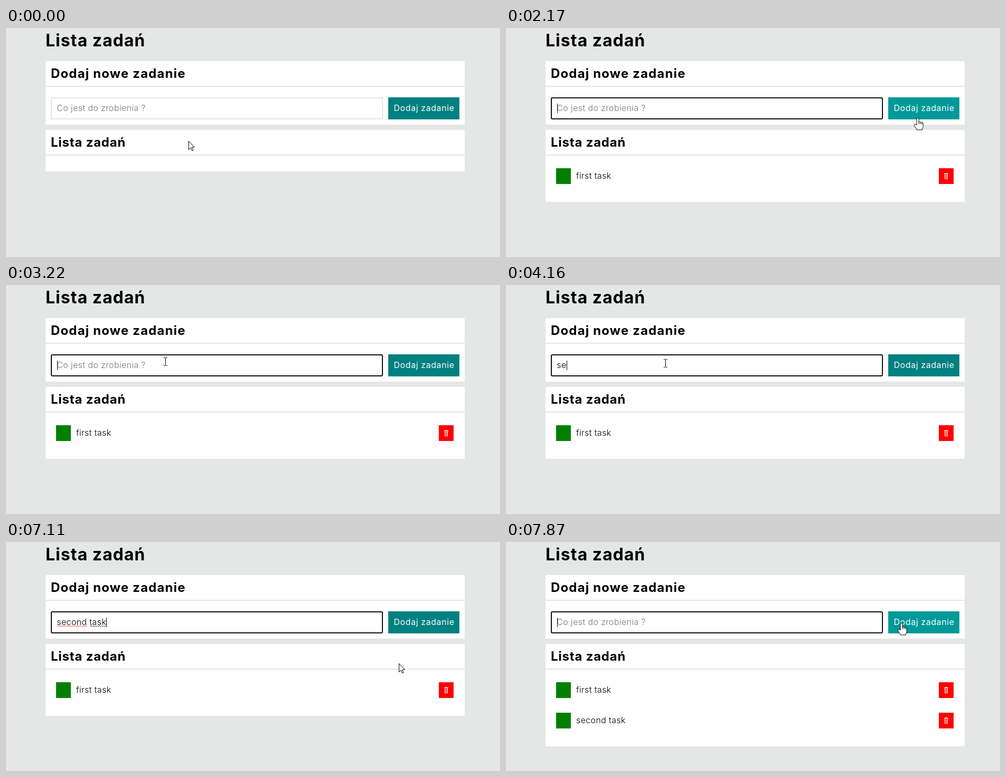
An HTML page for the animation above (8 s loop, 937x436 px).

```html
<!DOCTYPE html>
<html lang="pl">
<head>
<meta charset="utf-8">
<title>Lista zadań</title>
<style>
  html, body { margin: 0; width: 100%; height: 100%; overflow: hidden; background: #e4e7e5; }
  svg { display: block; }
  text { font: 350 16px Inter, Lato, sans-serif; font-optical-sizing: none; letter-spacing: .023em; }
  .h1 { font-size: 32px; font-weight: 700; letter-spacing: .032em; }
  .h2 { font-size: 24px; font-weight: 700; letter-spacing: .032em; }
  .wide { letter-spacing: .048em; }
  .label { fill: #fff; font-weight: 400; letter-spacing: .036em; }
  .hint { fill: #757575; }
  .wave { fill: none; stroke-width: .9; }
</style>
</head>
<body>
<svg width="937" height="436" viewBox="0 0 937 436">
  <defs>
    <g id="trash" fill="none" stroke="#fff">
      <path d="M831 277.5h8M832.5 278v9.5h5V278M833.5 276.5h3" />
      <path d="M834.5 279v7M836 279v7" stroke-width=".7" />
    </g>
  </defs>

  <text class="h1" x="75" y="35">Lista zadań</text>

  <rect x="75" y="63" width="795" height="121" fill="#fff" />
  <rect x="75" y="110" width="795" height="2" fill="#e4e7e5" />
  <text class="h2 wide" x="85" y="95">Dodaj nowe zadanie</text>

  <rect id="field" x="86" y="133" width="628" height="40" fill="#fff" stroke-width="2" />
  <text id="hint" class="hint" x="96.3" y="158">Co jest do zrobienia ?</text>
  <text id="typed" x="96.3" y="158" xml:space="preserve"></text>
  <path id="wave1" class="wave" stroke="#f22" />
  <path id="wave2" class="wave" />
  <rect id="caret" y="144" width="1" height="18" />

  <rect id="button" x="725" y="132" width="135" height="42" />
  <text class="label" x="735.5" y="158">Dodaj zadanie</text>

  <rect id="panel" x="75" y="194" width="795" fill="#fff" />
  <rect x="75" y="241" width="795" height="2" fill="#e4e7e5" />
  <text class="h2" x="85" y="226">Lista zadań</text>

  <g id="row1">
    <rect x="95" y="267" width="28" height="30" fill="#008000" />
    <text x="133" y="287">first task</text>
    <rect x="821" y="267" width="28" height="30" fill="#f00" />
    <use href="#trash" />
  </g>
  <g id="row2" transform="translate(0 58)">
    <rect x="95" y="267" width="28" height="30" fill="#008000" />
    <text x="133" y="287">second task</text>
    <rect x="821" y="267" width="28" height="30" fill="#f00" />
    <use href="#trash" />
  </g>

  <g id="mouse">
    <path id="arrow" d="M.5.5V16.5L4.2 13L6.8 18.7L9 17.8L6.6 12H11.5Z" fill="#fff" stroke="#000" />
    <path id="beam" d="M-3-7.5H0M1-7.5H4M.5-7V7M-3 7.5H0M1 7.5H4" fill="none" stroke="#000" />
    <path id="hand" d="M-2 14V2a2 2 0 0 1 4 0V8q2-1.5 3 .6q2-1 3 .8q2.2-.5 2.2 1.8V16q0 3-2 5V23H-2V21.5Q-5 18-6.7 14.5Q-7 11.6-4.6 12Z M2 8v4M5 9v3M8 10v2.500" fill="#fff" stroke="#000" />
  </g>
</svg>

<script>
const LOOP = 8000, STEP = 70, BLINK = 530;
const $ = id => document.getElementById(id);
const show = (id, on) => { $(id).style.display = on ? '' : 'none'; };

// time, x, y of the pointer; moves between rows go in whole steps
const path = [
  [0, 346, 215], [70, 290, 175], [210, 290, 175], [280, 289, 164], [350, 289, 156],
  [1410, 289, 156], [1550, 661, 148], [1690, 750, 160], [1830, 781, 171],
  [2310, 781, 171], [2450, 646, 175], [2660, 324, 89], [2730, 318, 97],
  [3010, 302, 146], [3490, 302, 146], [3630, 302, 149],
  [6760, 302, 149], [6970, 600, 265], [7110, 745, 231], [7320, 750, 185], [7530, 750, 154]
];

const FOCUS = 680;
const entries = [
  { text: 'first task', keys: [...'first task'].map((c, i) => 1070 + i * 46),
    wave: [1300, 1480], color: '#f22', blur: 1900, add: 1970 },
  { text: 'second task', keys: [3960, 4160, 4420, 4620, 4890, 5020, 5220, 5420, 5620, 5820, 6020],
    wave: [5420, 6830], color: '#222', blur: 7670, add: 7740 }
];
const wakes = [FOCUS, ...entries.flatMap(e => [...e.keys, e.add])];

function pointer(t) {
  const i = path.findLastIndex(p => p[0] <= t);
  const a = path[i], b = path[i + 1] || a;
  const u = b === a ? 0 : Math.floor((t - a[0]) / STEP) * STEP / (b[0] - a[0]);
  return [1, 2].map(k => Math.round(a[k] + (b[k] - a[k]) * u));
}

function squiggle(id, on, from, to) {
  show(id, on);
  if (!on) return;
  let d = '';
  for (let x = from, i = 0; x <= to; x += 2, i++) d += (i ? 'L' : 'M') + x + ' ' + (i % 2 ? 159.3 : 161.3);
  $(id).setAttribute('d', d);
}

function draw(t) {
  const entry = entries.find(e => t < e.add);
  const count = entry ? entry.keys.filter(k => k <= t).length : 0;
  const focus = t >= FOCUS && !(entry && t >= entry.blur);
  const typed = $('typed');
  typed.textContent = entry ? entry.text.slice(0, count) : '';
  show('hint', !count);

  $('field').setAttribute('stroke', focus ? '#101010' : '#e4e7e5');
  $('field').setAttribute('rx', focus ? 2 : 0);

  const width = n => n ? typed.getSubStringLength(0, n) : 0;
  const woke = Math.max(...wakes.filter(w => w <= t));
  show('caret', focus && Math.floor((t - woke) / BLINK) % 2 === 0);
  $('caret').setAttribute('x', Math.round(96.5 + width(count)));

  const gap = entry ? entry.text.indexOf(' ') : 0;
  const waved = n => focus && !!entry && t >= entry.wave[n];
  squiggle('wave1', waved(0), 97, 96 + width(Math.min(gap, count)));
  squiggle('wave2', waved(1), 97 + width(Math.min(gap + 1, count)), 96 + width(count));
  if (entry) $('wave2').setAttribute('stroke', entry.color);

  const done = entries.filter(e => t >= e.add).length;
  $('panel').setAttribute('height', 79 + 58 * done);
  show('row1', done > 0);
  show('row2', done > 1);

  const [x, y] = pointer(t);
  const inBar = y >= 132 && y < 174;
  const onField = inBar && x >= 85 && x < 715;
  const onButton = inBar && x >= 725 && x < 860;
  $('button').setAttribute('fill', onButton ? '#009999' : '#008080');
  $('mouse').setAttribute('transform', `translate(${x} ${y})`);
  show('beam', onField);
  show('hand', onButton);
  show('arrow', !onField && !onButton);
}

const start = performance.now();
function tick() {
  draw((performance.now() - start) % LOOP);
  requestAnimationFrame(tick);
}
tick();
</script>
</body>
</html>
```
